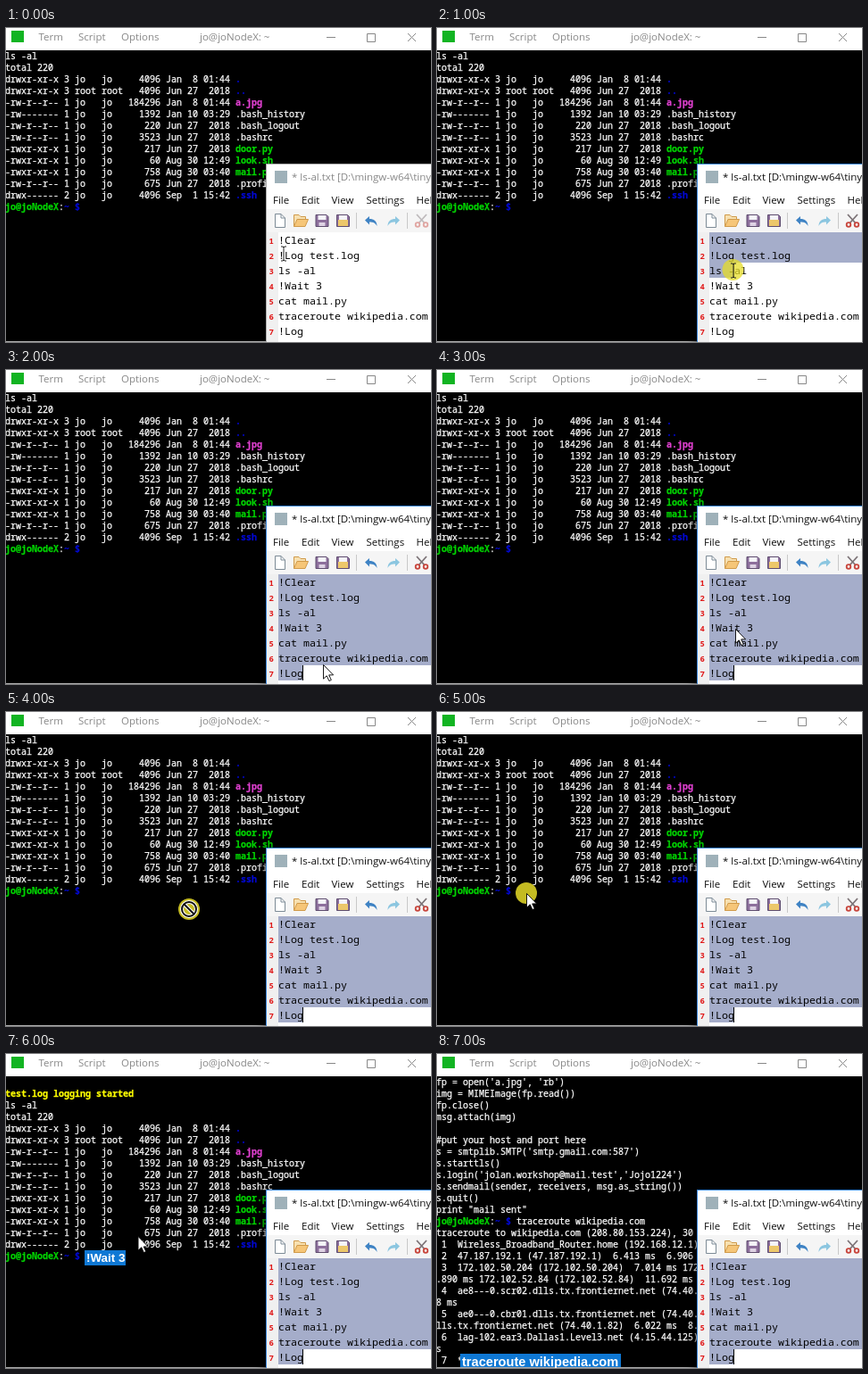
Recreate the animation shown at these times as an HTML page. Size 476 px wide and 352 px high, loop 8000 ms.

```html
<!DOCTYPE html>
<html lang="en">
<head>
<meta charset="utf-8">
<title>Terminal script demo</title>
<style>
html, body { margin: 0; width: 100%; height: 100%; overflow: hidden; background: #000; }
svg { display: block; width: 100vw; height: 100vh; }
text { white-space: pre; }
.ui { font: 11.5px "Open Sans", "Noto Sans", sans-serif; }
.term { font: 10px "Noto Sans Mono", "DejaVu Sans Mono", monospace; stroke-width: .25; }
.edit { font: 11.667px "Noto Sans Mono", "DejaVu Sans Mono", monospace; fill: #000; }
.num { font: bold 9px "Noto Sans Mono", "DejaVu Sans Mono", monospace; fill: #e01818; }
.tip { font-family: "Liberation Sans", Arial, sans-serif; font-weight: bold; fill: #fff; }
</style>
</head>
<body>
<svg viewBox="0 0 476 352" preserveAspectRatio="none">
  <defs>
    <filter id="blur" x="-20%" y="-20%" width="140%" height="140%"><feGaussianBlur stdDeviation="6"/></filter>
    <path id="arrow" d="M.5 .5V16.2L4.2 12.8L6.9 18.6L9.3 17.5L6.7 11.9H11.6Z" fill="#fff" stroke="#000" stroke-width=".9"/>
    <path id="beam" d="M-3 -8H-1L0 -7L1 -8H3M0 -7V7M-3 8H-1L0 7L1 8H3" fill="none" stroke="#222"/>
    <g id="floppy">
      <path d="M.5 .5H12.5L14.5 2.5V13.5H.5Z" fill="#8d6f9c" stroke="#5d4c6e"/>
      <path d="M3 1H12V6H3Z" fill="#f4f4f8"/>
      <path d="M4 9H11V13H4Z" fill="#ded3e4"/>
    </g>
    <path id="turn" d="M0 5.5L5 1V4C10 4 13.5 6.5 13.5 12C12 8.8 9.5 7.6 5 7.5V10.5Z"/>
  </defs>

  <rect width="476" height="352"/>
  <g id="term" class="term"></g>
  <path d="M0 351.5H291" stroke="#aaa"/>

  <rect width="476" height="25" fill="#fff"/>
  <rect x="6" y="3" width="14" height="13" fill="#12b422"/>
  <g class="ui" fill="#888">
    <text x="36.5" y="14">Term</text>
    <text x="81" y="14">Script</text>
    <text x="129" y="14">Options</text>
    <text x="217" y="14">jo@joNodeX: ~</text>
  </g>
  <path d="M359 10.5H369M404.5 6.5H413.5V15.5H404.5ZM450 6L459 15M459 6L450 15" fill="none" stroke="#888"/>

  <rect id="shade" x="289" y="153" width="200" height="210" opacity=".6" filter="url(#blur)"/>
  <rect id="frame" x="291.5" y="152.5" width="200" height="210" fill="#fff"/>
  <rect x="301" y="160" width="14" height="14" fill="#9fb1b9"/>
  <text id="title" class="ui" x="320" y="171">* ls-al.txt [D:\mingw-w64\tiny</text>
  <g class="ui" fill="#111">
    <text x="299" y="197">File</text>
    <text x="331" y="197">Edit</text>
    <text x="364.5" y="197">View</text>
    <text x="403.5" y="197">Settings</text>
    <text x="459.5" y="197">Help</text>
  </g>
  <rect x="292" y="203" width="184" height="26" fill="#f5f5f5"/>
  <path d="M301.5 208.5H308L312.5 213V223.5H301.5Z" fill="#fff" stroke="#7d8b96"/>
  <path d="M308 208.5V213H312.5" fill="none" stroke="#7d8b96"/>
  <path d="M322.5 222.5V209.5H328L330 211.5H335.5V214" fill="#f7e0b0" stroke="#d09a4a"/>
  <path d="M322.5 222.5L326 214.5H338.5L335 222.5Z" fill="#f6c678" stroke="#d09a4a"/>
  <use href="#floppy" x="346.5" y="209"/>
  <use href="#floppy" x="370" y="209"/>
  <path d="M372 215H383V222H372Z" fill="#ecc76a"/>
  <path d="M392.5 207V225M449.5 207V225" stroke="#c8c8c8"/>
  <use href="#turn" x="402" y="210" fill="#3f83c4"/>
  <use href="#turn" transform="translate(441 210) scale(-1 1)" fill="#8cc6e0"/>
  <g id="cut" fill="none" stroke-width="1.8">
    <path d="M460 209L469 219M471 209L462 219" stroke="#7d7478"/>
    <g stroke="#c8453c"><circle cx="461" cy="220.5" r="2.3"/><circle cx="470" cy="220.5" r="2.3"/></g>
  </g>
  <rect x="292" y="229" width="13" height="123" fill="#f0f0f0"/>
  <path id="sel" fill="#a5adca"/>
  <g id="edit"></g>
  <path id="caret" stroke="#000"/>

  <g id="tip"><rect fill="#0f78d4"/><text class="tip"></text></g>
  <circle id="glow" r="12" fill="#e6dc28"/>
  <g id="pointer"></g>
</svg>
<script>
const $ = id => document.getElementById(id);
const ink = { w: "#fff", g: "#00d400", b: "#0008d0", m: "#e040d0", y: "#ffff00" };

// "{g}text" switches the colour for what follows; colours other than white are bold
const span = (s, c) =>
  `<tspan fill="${ink[c]}" stroke="${ink[c]}" font-weight="${c === "w" ? 400 : 700}">${s}</tspan>`;
const paint = s => s.split(/\{(\w)\}/).map((part, i, all) =>
  i % 2 ? "" : span(part, i ? all[i - 1] : "w")).join("");
const rows = list => list.map((s, i) =>
  `<text x="-1" y="${35 + 13 * i}">${paint(s)}</text>`).join("");

const entry = (mode, links, who, size, date, name) =>
  `${mode} ${links} ${who.padEnd(4)} ${who.padEnd(4)}${String(size).padStart(7)} ${date} ${name}`;
const dir = "drwxr-xr-x", file = "-rw-r--r--", exe = "-rwxr-xr-x", old = "Jun 27  2018";
const prompt = "{g}jo@joNodeX{w}:{b}~ $ ";

const listing = [
  "ls -al",
  "total 220",
  entry(dir, 3, "jo", 4096, "Jan  8 01:44", "{b}."),
  entry(dir, 3, "root", 4096, old, "{b}.."),
  entry(file, 1, "jo", 184296, "Jan  8 01:44", "{m}a.jpg"),
  entry("-rw-------", 1, "jo", 1392, "Jan 10 03:29", ".bash_history"),
  entry(file, 1, "jo", 220, old, ".bash_logout"),
  entry(file, 1, "jo", 3523, old, ".bashrc"),
  entry(exe, 1, "jo", 217, old, "{g}door.py"),
  entry(exe, 1, "jo", 60, "Aug 30 12:49", "{g}look.sh"),
  entry(exe, 1, "jo", 758, "Aug 30 03:40", "{g}mail.py"),
  entry(file, 1, "jo", 675, old, ".profile"),
  entry("drwx------", 2, "jo", 4096, "Sep  1 15:42", "{b}.ssh"),
  prompt
];

const trace = `fp = open('a.jpg', 'rb')
img = MIMEImage(fp.read())
fp.close()
msg.attach(img)

#put your host and port here
s = smtplib.SMTP('smtp.gmail.com:587')
s.starttls()
s.login('jolan.workshop@mail.test','Jojo1224')
s.sendmail(sender, receivers, msg.as_string())
s.quit()
print "mail sent"
${prompt}{w}traceroute wikipedia.com
traceroute to wikipedia.com (208.80.153.224), 30
 1  Wireless_Broadband_Router.home (192.168.12.1)
 2  47.187.192.1 (47.187.192.1)  6.413 ms  6.906
 3  172.102.50.204 (172.102.50.204)  7.014 ms 172
.890 ms 172.102.52.84 (172.102.52.84)  11.692 ms
 4  ae8---0.scr02.dlls.tx.frontiernet.net (74.40.
8 ms
 5  ae0---0.cbr01.dlls.tx.frontiernet.net (74.40.
lls.tx.frontiernet.net (74.40.1.82)  6.022 ms  8.
 6  lag-102.ear3.Dallas1.Level3.net (4.15.44.125)
s
 7  *`.split("\n");

const screens = [
  listing,
  ["", "{y}test.log logging started", ...listing],
  trace
].map(rows);

const script = ["!Clear", "!Log test.log", "ls -al", "!Wait 3", "cat mail.py",
  "traceroute wikipedia.com", "!Log"];
$("edit").innerHTML = script.map((s, i) =>
  `<text class="num" x="294.5" y="${242 + 17 * i}">${i + 1}</text>` +
  `<text class="edit" x="305" y="${242 + 17 * i}">${s}</text>`).join("");

const use = (id, x, y) => `<use href="#${id}" x="${x}" y="${y}"/>`;
const ring = `<g transform="translate(205 221)" fill="none">
  <circle r="8" stroke="#fff" stroke-width="4"/><path d="M-5.5 -5.5L5.5 5.5" stroke="#fff" stroke-width="4"/>
  <circle r="8" stroke="#111" stroke-width="2"/><path d="M-5.5 -5.5L5.5 5.5" stroke="#111" stroke-width="2"/></g>`;

// One step per second; sel is the last selected line
const wait = { box: [88, 220, 46, 17], text: "!Wait 3", size: 13.4, at: [90, 233] };
const hop = { box: [26, 336, 180, 15], text: "traceroute wikipedia.com", size: 14.6, at: [28, 350] };
const steps = [
  { screen: 0, sel: 0, pointer: use("beam", 311, 253) },
  { screen: 0, sel: 3, pointer: use("beam", 332, 272), glow: [331.5, 271, .75] },
  { screen: 0, sel: 7, pointer: use("arrow", 355, 330) },
  { screen: 0, sel: 7, pointer: use("arrow", 334, 290) },
  { screen: 0, sel: 7, pointer: ring, glow: [205, 221, .85] },
  { screen: 0, sel: 7, pointer: use("arrow", 100, 203), glow: [100, 203, .85] },
  { screen: 1, sel: 7, pointer: use("arrow", 147.5, 204), tip: wait },
  { screen: 2, sel: 7, pointer: "", tip: hop }
];

const set = (el, attrs) => { for (const k in attrs) el.setAttribute(k, attrs[k]); };
const show = (el, on) => el.setAttribute("visibility", on ? "visible" : "hidden");

function render(n) {
  const { screen, sel, pointer, glow, tip } = steps[n];
  $("term").innerHTML = screens[screen];
  $("pointer").innerHTML = pointer;

  // The editor gains focus with its first selection
  set($("title"), { fill: sel ? "#111" : "#888" });
  set($("frame"), { stroke: sel ? "#3a86d8" : "#aaa" });
  set($("cut"), { opacity: sel ? 1 : .45 });
  show($("shade"), sel);

  const y = 212 + 17 * sel;
  set($("sel"), { d: sel ? `M305 229H476V${y}H333V${y + 17}H305Z` : "" });
  set($("caret"), { d: sel ? `M332.5 ${y}V${y + 17}` : "" });

  show($("glow"), glow);
  if (glow) set($("glow"), { cx: glow[0], cy: glow[1], opacity: glow[2] });

  show($("tip"), tip);
  if (tip) {
    const [rect, label] = $("tip").children;
    const [x, y, width, height] = tip.box;
    set(rect, { x, y, width, height });
    set(label, { x: tip.at[0], y: tip.at[1], "font-size": tip.size });
    label.textContent = tip.text;
  }
}

const start = performance.now();
let last = -1;
function tick() {
  const n = Math.floor((performance.now() - start) % 8000 / 1000);
  if (n !== last) render(last = n);
  requestAnimationFrame(tick);
}
tick();
</script>
</body>
</html>
```
